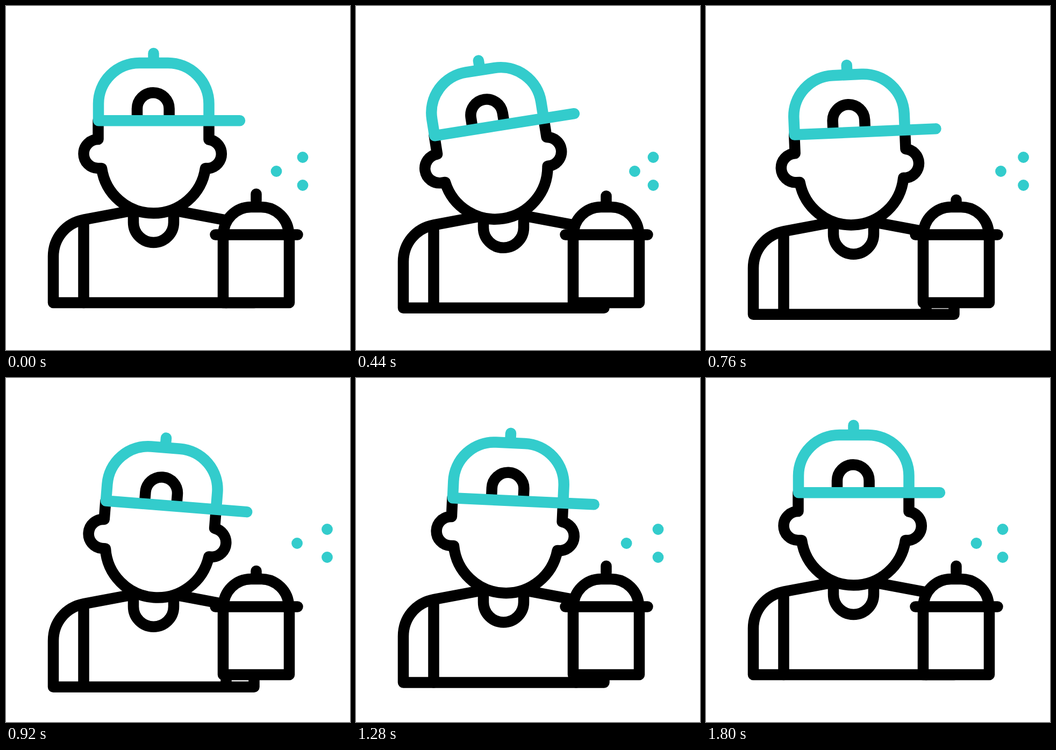
Animation of 640 by 640 pixels, one loop 2000 ms. Source, as an HTML page:

```html
<!DOCTYPE html>
<html>
<head>
<meta charset="utf-8">
<style>
html, body { margin: 0; width: 100%; height: 100%; overflow: hidden; background: #fff; }
svg { display: block; width: 100vw; height: 100vh; }
.line { fill: none; stroke: #000; stroke-width: 20.5; stroke-linecap: round; stroke-linejoin: round; }
.fill { fill: #fff; }
.teal { stroke: #33cccc; }
.dot { fill: #33cccc; }
</style>
</head>
<body>
<svg viewBox="0 0 640 640">
  <g class="line">
    <g id="person">
      <path d="M225 382.5L145 397.5C111 404 88 432 88 466V552H461.5V466C461.5 432 438 404 404 397.5L324 382.5"/>
      <path d="M144.5 399V552M409.5 402V552"/>
      <path d="M237 390V402.5A37.5 37.5 0 0 0 312 402.5V390"/>
      <g id="head">
        <path class="fill" d="M171.5 213V248A27 27 0 0 0 171.5 302H178A97.5 97.5 0 0 0 371 302H377.5A27 27 0 0 0 377.5 248.5V213"/>
        <path d="M244 208V191A29.8 29.8 0 0 1 303.6 191V208"/>
        <path class="teal" d="M274.5 88V106M435 213.3H172V182A76 76 0 0 1 248 106H301.5A76 76 0 0 1 377.5 182V213"/>
      </g>
    </g>
    <path id="nozzle" d="M465.5 349.7V362"/>
    <path class="fill" d="M404 425.5V552H527V425.5"/>
    <path class="fill" d="M404.5 425.5A51.5 51.5 0 0 1 456 374H474.5A51.5 51.5 0 0 1 526 425.5"/>
    <path d="M389.5 425.5H542.5"/>
  </g>
  <circle id="near" class="dot" cx="503" cy="307.5" r="10.4"/>
  <g id="far" class="dot">
    <circle cx="552" cy="281.5" r="10.4"/>
    <circle cx="552" cy="333.5" r="10.4"/>
  </g>
</svg>
<script>
const LOOP = 2000, STEP = 40;
const $ = id => document.getElementById(id);

// Cubic easing with handles (a, 0) and (b, 1), solved by bisection.
function ease(x, a, b) {
  let lo = 0, hi = 1, u = 0.5;
  for (let i = 0; i < 24; i++) {
    u = (lo + hi) / 2;
    const v = 1 - u;
    if (3 * a * u * v * v + 3 * b * u * u * v + u * u * u < x) lo = u; else hi = u;
  }
  return u * u * (3 - 2 * u);
}

// Keys are [time, value] pairs.
function track(t, keys, a, b) {
  if (t <= keys[0][0]) return keys[0][1];
  for (let i = 1; i < keys.length; i++) {
    const [t0, v0] = keys[i - 1], [t1, v1] = keys[i];
    if (t < t1) return v0 + (v1 - v0) * ease((t - t0) / (t1 - t0), a, b);
  }
  return keys[keys.length - 1][1];
}

const person = t => track(t, [[67, 0], [933, 22.7], [1800, 0]], 0.52, 0.37);
const tilt = t => track(t, [[67, 0], [560, -9.6], [1000, 5], [1620, 0]], 0.52, 0.37);
const press = t => track(t, [[211, 0], [759, 1], [1307, 0]], 0.5, 0.5);
const move = (id, x, y) => $(id).setAttribute("transform", `translate(${x} ${y})`);

function draw(now) {
  const t = Math.floor(now % LOOP / STEP) * STEP;
  move("person", 0, person(t));
  $("head").setAttribute("transform", `rotate(${tilt(t)} 274.5 387)`);
  move("nozzle", 0, 11 * press(t));
  move("near", 45.5 * press(t), 0);
  move("far", 45.5 * press(t - 162), 0);
}

let start;
function tick(now) {
  start ??= now;
  draw(now - start);
  requestAnimationFrame(tick);
}
draw(0);
requestAnimationFrame(tick);
</script>
</body>
</html>
```
